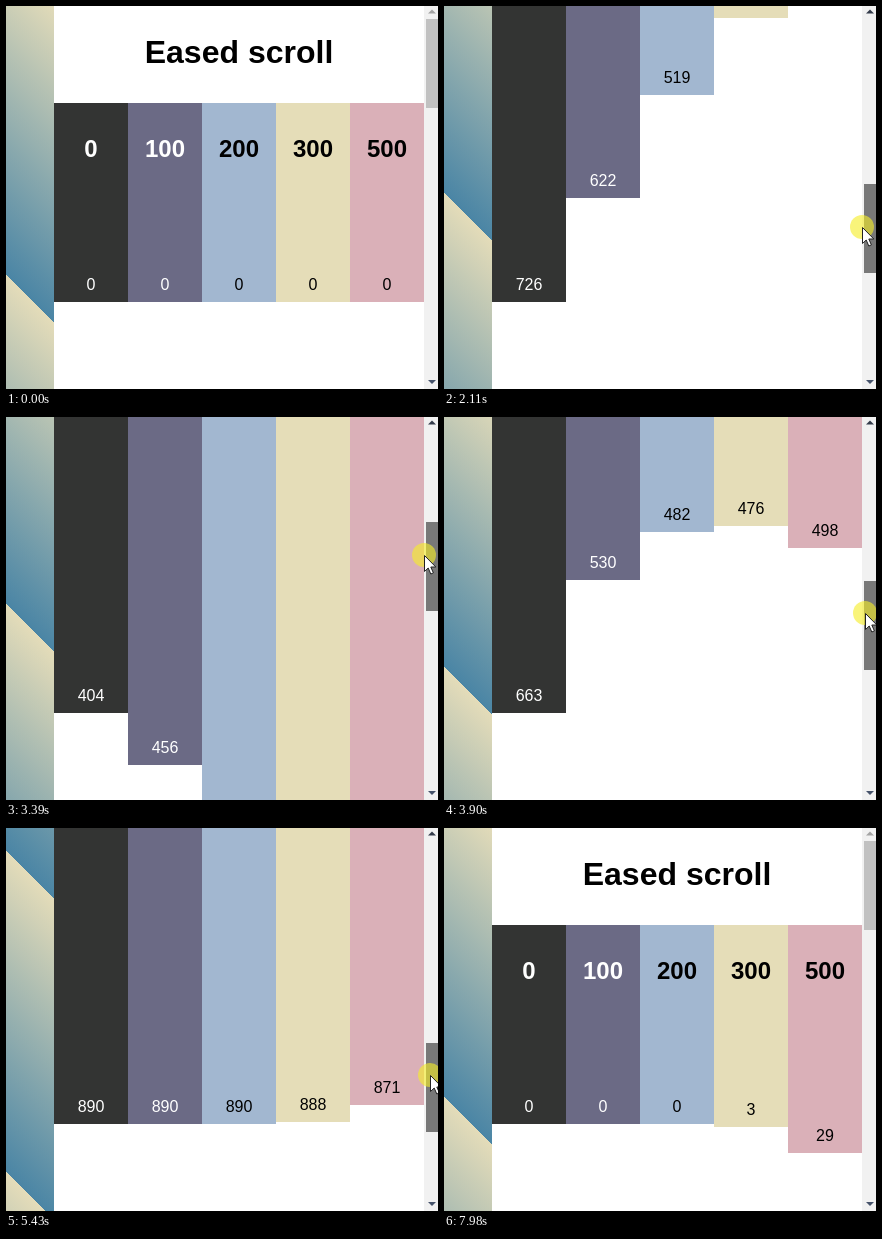
Animation, 432 px wide and 383 px high, one loop 8000 ms. Source, as an HTML page:

```html
<!DOCTYPE html>
<html lang="en">
<head>
<meta charset="utf-8">
<title>Eased scroll</title>
<style>
  html, body { margin: 0; width: 100%; height: 100%; overflow: hidden; background: #fff; }
  body { position: relative; font: 16px/18px Arial, "Liberation Sans", sans-serif; color: #000; }
  #page, #page *, #bar, #bar *, #cursor { position: absolute; }
  #page { left: 0; top: 0; width: 418px; height: 1600px; }
  #strip {
    left: 0; top: -5.5px; width: 48px; height: 1600px;
    background: repeating-linear-gradient(225deg, #e4dcb9 0, #4a85a5 227.5px);
  }
  h1 { left: 48px; top: 28px; width: 370px; margin: 0; font-size: 32px; line-height: 36px; text-align: center; }
  .column { top: 97px; width: 74px; text-align: center; }
  .column b { left: 0; top: 32px; width: 100%; font-size: 24px; line-height: 28px; }
  .column span { left: 0; bottom: 8px; width: 100%; }
  #bar { left: 418px; top: 0; width: 14px; height: 383px; background: #f1f1f1; }
  #thumb { left: 2px; top: 13px; width: 12px; height: 89px; }
  #bar svg { left: 0; top: 0; }
  #cursor { left: 0; top: 0; overflow: visible; }
</style>
</head>
<body>
<div id="page">
  <div id="strip"></div>
  <h1>Eased scroll</h1>
</div>
<div id="bar">
  <div id="thumb"></div>
  <svg width="14" height="383">
    <path id="up" d="M4 7.5l4-4 4 4z"/>
    <path d="M4 374l4 4 4-4z" fill="#46536b"/>
  </svg>
</div>
<svg id="cursor" width="1" height="1">
  <circle id="press" r="12" fill="#f6ee28" fill-opacity=".62"/>
  <path d="M.5.5v16l3.7-3.5 2.6 6 2.6-1.1-2.6-5.9h5z" fill="#fff" stroke="#222"/>
</svg>
<script>
const LOOP = 8000, STEP = 4;

// Keys are [time, value] pairs.
const scrollKeys = [[1293, 0], [2440, 900], [3630, 349.5], [4120, 890], [6070, 890], [6525, 0]];
const cursorX = [[690, 440], [820, 424], [1293, 424], [2000, 418], [3630, 418], [4120, 424]];
const gripY = [[2110, 43], [3390, 33], [6070, 32], [6600, -13], [6900, -40]];
const thumbGrey = [[690, 193], [820, 168], [1000, 168], [1050, 120], [6900, 120], [7000, 193]];

// delay is the label, tau the time constant of the exponential lag
const columns = [
  { delay: 0, tau: 0, back: '#333433', ink: '#fff' },
  { delay: 100, tau: 97, back: '#6b6a85', ink: '#fff' },
  { delay: 200, tau: 194, back: '#a2b7d0', ink: '#000' },
  { delay: 300, tau: 285, back: '#e5ddb8', ink: '#000' },
  { delay: 500, tau: 490, back: '#dab0b8', ink: '#000' }
];

const $ = id => document.getElementById(id);

function tween(keys, t) {
  const next = keys.findIndex(key => key[0] > t);
  if (next === 0) return keys[0][1];
  if (next < 0) return keys[keys.length - 1][1];
  const [t0, a] = keys[next - 1], [t1, b] = keys[next];
  return a + (b - a) * (1 - Math.cos(Math.PI * (t - t0) / (t1 - t0))) / 2;
}

// Each column follows the scroll position; store its whole course once.
const steps = LOOP / STEP;
const scrolls = Array.from({ length: steps + 1 }, (_, i) => tween(scrollKeys, i * STEP));

columns.forEach((col, i) => {
  const follow = col.tau ? 1 - Math.exp(-STEP / col.tau) : 1;
  let value = 0;
  col.course = scrolls.map(target => value += (target - value) * follow);

  col.box = document.createElement('div');
  col.box.className = 'column';
  col.box.style.cssText = `left:${48 + 74 * i}px;background:${col.back};color:${col.ink}`;
  col.box.innerHTML = `<b>${col.delay}</b><span>0</span>`;
  col.count = col.box.lastChild;
  $('page').append(col.box);
});

function draw(t) {
  const at = Math.floor(t / STEP);
  const scroll = Math.round(scrolls[at]);
  $('page').style.top = -scroll + 'px';
  for (const col of columns) {
    const value = Math.round(col.course[at]);
    col.box.style.height = 199 + value + 'px';
    col.count.textContent = value;
  }

  const thumbTop = 13 + scroll * 0.227;
  const grey = tween(thumbGrey, t);
  $('thumb').style.top = Math.round(thumbTop) + 'px';
  $('thumb').style.background = `rgb(${grey},${grey},${grey})`;
  $('up').setAttribute('fill', scroll ? '#333b4a' : '#a3a3a3');

  const x = Math.round(tween(cursorX, t)), y = Math.round(thumbTop + tween(gripY, t));
  $('cursor').style.transform = `translate(${x}px,${y}px)`;
  $('cursor').style.display = t > 690 && t < 6900 ? '' : 'none';
  $('press').style.display = t >= 1000 ? '' : 'none';
}

const start = performance.now();
function frame() {
  draw((performance.now() - start) % LOOP);
  requestAnimationFrame(frame);
}
frame();
</script>
</body>
</html>
```
